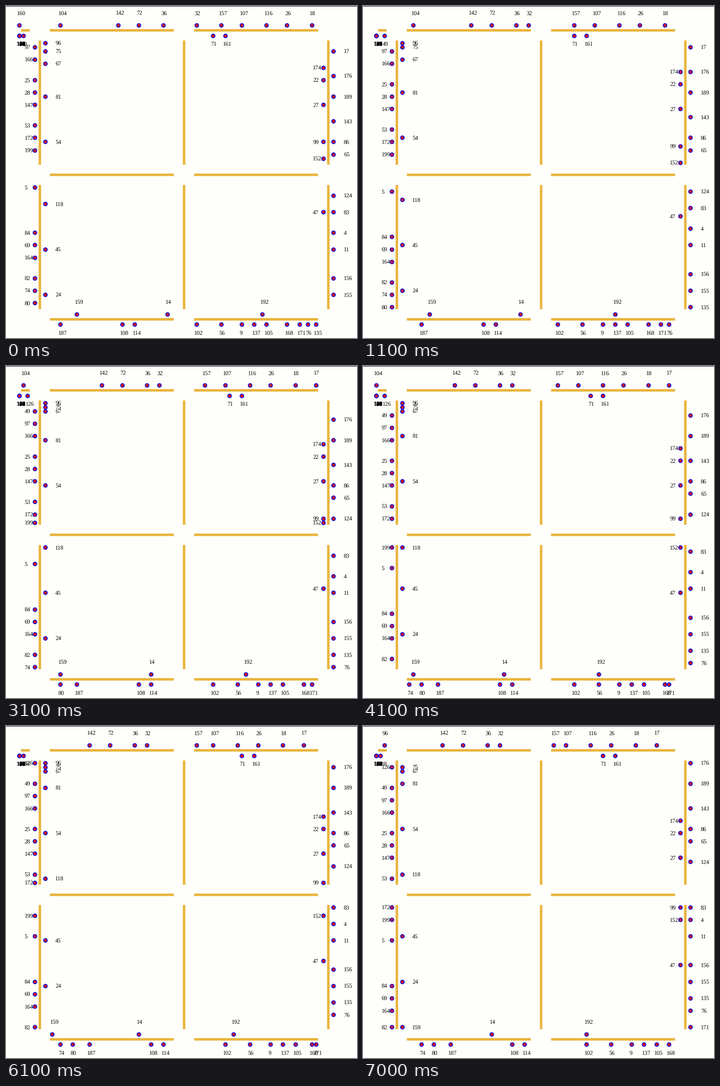
Write a matplotlib script that moves like this. It is 770x727 px and loops after 8 s.

```python
import matplotlib.pyplot as plt
from matplotlib.animation import FuncAnimation
from matplotlib.patches import Rectangle

W, H, DPI = 770, 727, 100
PX = 72 / DPI
U = 9.04                    # one cell
BLOCK = 35 * U              # distance between parallel roads
X0, Y0 = 101.2, 80.5        # first cell of the horizontal / vertical roads
ROADS_X = [74.3 + BLOCK * i for i in range(3)]
ROADS_Y = [53.3 + BLOCK * i for i in range(3)]
SIDE = 1.25 * U             # lane distance from the road
FAR, NEAR = 2.5 * U, 0.5 * U
PAPER, GOLD, RED, BLUE = "#fefefb", "#e9b53c", "#dc141e", "#0a14dc"

CELLS = list(range(30)) + list(range(35, 65))
BACK = CELLS[::-1]
STUB = [-8, -7, -6]


def row(road, side, cells):
    """Horizontal lane: (dot x, dot y, label x, label baseline) per cell."""
    y = ROADS_Y[road] + side * SIDE
    return [(X0 + U * k, y, X0 + U * k - NEAR, y + side * FAR) for k in cells]


def column(road, side, cells):
    x = ROADS_X[road] + side * SIDE
    return [(x, Y0 + U * k, x + side * FAR, Y0 + U * k + NEAR) for k in cells]


# Both routes end in the queue at the top left corner.
QUEUE = row(0, 1, STUB[:1])
EXIT = row(0, -1, STUB[::-1]) + QUEUE
OUTER = (row(0, 1, STUB) + column(0, -1, CELLS) + row(2, 1, CELLS)
         + column(2, 1, BACK) + row(0, -1, BACK) + EXIT)
INNER = (row(0, 1, CELLS) + column(2, -1, CELLS) + row(2, -1, BACK)
         + column(0, 1, BACK) + EXIT)

# Platoons of cars: first cell, headway, car numbers
PERIOD = 11                 # cells between platoons of one run
OUTER_RUNS = [
    (-8, 3, "138 126 49 97 166"), (9, 3, "25 28 147", "53 172 199"),
    (30, 3, "5", "84 69 164", "82 74 80"), (62, 3, "187"),
    (77, 3, "108 114"), (90, 6, "102 56"), (101, 3, "9 137 105", "168 171"),
    (117, 2, "76 135"), (123, 4, "155 156", "11 4"), (143, 4, "83 124"),
    (152, 3, "65 86"), (160, 6, "143 189", "176 17"),
    (181, 6, "18 26", "116 107", "157 32"), (212, 6, "36 72", "142"),
    (237, 5, "104 160"),
]
INNER_RUNS = [
    (34, 3, "71 161"), (66, 3, "174 22"), (75, 9, "27 99"), (88, 8, "152 47"),
    (133, 18, "192 14"), (173, 10, "159 24"), (194, 11, "45 118"),
    (215, 11, "54 81"), (234, 3, "67 75"), (239, 1, "96"),
]

# Red lights: stop cell -> first and last tick
OUTER_RED = {-1: (5, 6), 29: (4, 4), 59: (8, 8), 119: (7, 7), 149: (7, 8),
             179: (3, 3), 209: (7, 8)}
INNER_RED = {89: (2, 4), 179: (7, 7), 209: (5, 5), 239: (1, 7)}

TICKS = 9
STARTS = [0, 11, 21, 31, 41, 51, 61, 70]    # picture changes, in frames


def line_up(runs):
    """Cell of every car at the start."""
    cells = {}
    for first, headway, *platoons in runs:
        for i, names in enumerate(platoons):
            for j, name in enumerate(names.split()):
                cells[name] = first + PERIOD * i + headway * j
    return cells


def advance(cells, red, tick):
    """Move every car one cell if its light and the car ahead allow it."""
    after = {}
    ahead, ahead_moved = 10**6, True
    for name in sorted(cells, key=cells.get, reverse=True):
        n = cells[name]
        first, last = red.get(n, (1, 0))
        at_stop_line = (n + 1) % 30 == 29
        gap = 3 if at_stop_line else 2 if ahead_moved else 1
        moves = not first <= tick <= last and ahead - (n + 1) >= gap
        after[name] = n + moves
        ahead, ahead_moved = after[name], moves
    return after


def simulate(runs, red, route, lead):
    """Spots of all cars at every tick."""
    cells, history = line_up(runs), []
    for tick in range(TICKS):
        if tick:
            cells = advance(cells, red, tick)
        history.append({name: route[min(max(n + lead, 0), len(route) - 1)]
                        for name, n in cells.items()})
    return history


HISTORY = [outer | inner for outer, inner in zip(
    simulate(OUTER_RUNS, OUTER_RED, OUTER, len(STUB)),
    simulate(INNER_RUNS, INNER_RED, INNER, 0))]

plt.rcParams["font.family"] = "Liberation Serif"
plt.rcParams["text.hinting"] = "none"

fig = plt.figure(figsize=(W / DPI, H / DPI), dpi=DPI, facecolor=PAPER)
ax = fig.add_axes([0, 0, 1, 1])
ax.set_xlim(0, W)
ax.set_ylim(H, 0)
ax.axis("off")


def bar(x, y, w, h, color=GOLD):
    ax.add_patch(Rectangle((x, y), w, h, facecolor=color, linewidth=0,
                           snap=False))


def label(name, x=0, y=0):
    return ax.text(x, y, str(name), fontsize=12.7 * PX, color="black",
                   ha="left", va="baseline", zorder=4)


THICK, LONG = 0.6 * U, 30.1 * U
for i in range(2):
    for y in ROADS_Y:
        bar(96.2 + BLOCK * i, y - THICK / 2, LONG, THICK)
    for x in ROADS_X:
        bar(x - THICK / 2, 75.5 + BLOCK * i, THICK, LONG)
bar(33, ROADS_Y[0] - THICK / 2, 19, THICK)
bar(0, 0, W, 1, "black")

dots, = ax.plot([], [], "o", ms=8.1 * PX, mfc=RED, mec=BLUE, mew=1.8 * PX,
                zorder=3)
labels = {name: label(name) for name in HISTORY[0]}
for n in range(100, 200, 2):
    if str(n) not in labels:
        label(n, *QUEUE[0][2:])


def draw(frame):
    step = sum(start <= frame for start in STARTS) - 1
    spots = HISTORY[step + (step > 1)]      # one tick is never shown
    for name, spot in spots.items():
        labels[name].set_position(spot[2:])
    places = list(spots.values()) + QUEUE
    dots.set_data([p[0] for p in places], [p[1] for p in places])
    return [dots, *labels.values()]


anim = FuncAnimation(fig, draw, frames=80, interval=100, repeat=True,
                     repeat_delay=0, blit=False)
plt.show()
```
